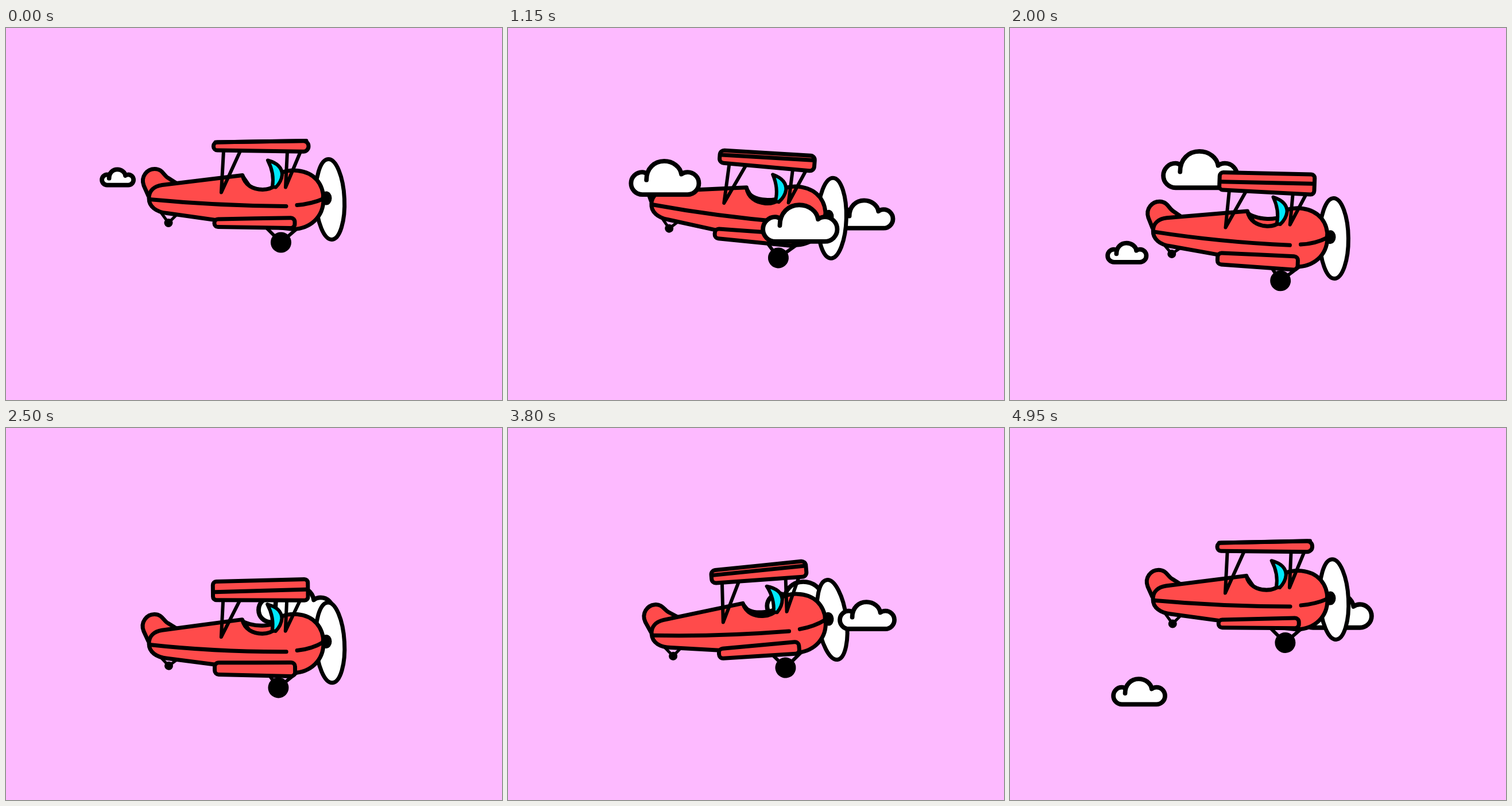
Animation, 864 px wide and 648 px high, one loop 5 s. Source, as an HTML page with a canvas:

```html
<!DOCTYPE html>
<html lang="en">
<head>
<meta charset="utf-8">
<title>Biplane</title>
<style>
  html, body { margin: 0; width: 100%; height: 100%; overflow: hidden; background: #fdbaff; }
  canvas { display: block; }
</style>
</head>
<body>
<canvas id="stage" width="864" height="648"></canvas>
<script>
const ctx = document.getElementById('stage').getContext('2d');
const LOOP = 5000, STEP = 50;
const RED = '#ff4b4b', CYAN = '#00e8fb', WHITE = '#fff', INK = '#000';
const HUB = { x: 558, y: 297 };

const FIN = new Path2D('M248 293L240 275C234 259 246 246 259 246C273 246 275 258 283 262L297 271L262 284Z');
const BODY = new Path2D(
  'M249 297C249 284 258 276 272 274L412 257C416 274 430 282 447 282C466 282 478 270 481 252' +
  'C490 249 500 248 508 249C537 252 553 272 553 299C553 330 530 350 500 351L365 335L280 323C262 321 249 312 249 297Z');
const GLASS = new Path2D('M456 231Q481 238 481 256Q480 268 470 278L464 277Q468 254 456 231Z');
const PUFF = 'C-35 -50 -20 -64 -1 -64C16 -64 30 -53 32 -39Q37 -43 44 -43' +
  'A21.5 21.5 0 0 1 44 0H-43A21.5 21.5 0 0 1 -43 -43Q-38 -43 -35 -40';
const CLOUD_FILL = new Path2D('M-35 -40' + PUFF);
const CLOUD_LINE = new Path2D('M-35 -28' + PUFF);

// mid: time at mid stage; y: height a + b*d + c*d*d, d in hundreds of pixels past the middle
const clouds = [
  { mid: -640, y: [260, 0, 0] },
  { mid: 719, y: [226.9, 9.6, 8], front: true },
  { mid: 1384, y: [359, 21.1, -3], front: true },
  { mid: 1727, y: [267.5, -24.2, 2.76] },
  { mid: 2722, y: [305.6, 3.1, 5.5] },
  { mid: 4055, y: [276.8, -24.3, 2] },
  { mid: 4390, y: [416, 33.5, -6], front: true },
  { mid: 5364, y: [281, -24, 1.5] }
];

function paint(path, fill, width = 7) {
  ctx.lineWidth = width;
  if (fill) {
    ctx.fillStyle = fill;
    ctx.fill(path);
  }
  ctx.stroke(path);
}

function line(...points) {
  const p = new Path2D();
  points.forEach(([x, y]) => p.lineTo(x, y));
  return p;
}

function dot(x, y, rx, ry = rx) {
  ctx.fillStyle = INK;
  ctx.beginPath();
  ctx.ellipse(x, y, rx, ry, 0, 0, 7);
  ctx.fill();
}

// Wing slab between two x positions; each end has its own top and bottom
function slab(x1, top1, bottom1, x2, top2, bottom2, radius) {
  const q = [[x1, top1], [x2, top2], [x2, bottom2], [x1, bottom1]];
  const r1 = Math.min(radius, (bottom1 - top1) / 2 - 0.3);
  const r2 = Math.min(radius, (bottom2 - top2) / 2 - 0.3);
  const p = new Path2D();
  p.moveTo((x1 + x2) / 2, (top1 + top2) / 2);
  for (let i = 1; i <= 4; i++) p.arcTo(...q[i % 4], ...q[(i + 1) % 4], i < 3 ? r2 : r1);
  p.closePath();
  return p;
}

function drawCloud(cloud, t) {
  const age = t - cloud.mid;
  const d = (0.349 * age + 2.5e-5 * age * age) / 100;
  const s = 1 - (Math.abs(d) / 2.64) ** 4.5;
  if (s < 0.4 || Math.abs(d) > 2.64) return;
  const [a, b, c] = cloud.y;
  const place = new DOMMatrix([s, 0, 0, s, 428 - 100 * d, a + b * d + c * d * d + 32 * s]);
  const placed = (shape) => {
    const p = new Path2D();
    p.addPath(shape, place);
    return p;
  };
  ctx.fillStyle = WHITE;
  ctx.fill(placed(CLOUD_FILL));
  paint(placed(CLOUD_LINE), null, 7.8);
}

function drawPlane(t) {
  const phase = t / LOOP * 2 * Math.PI, cos = Math.cos(phase), sin = Math.sin(phase);
  const k = (1 - cos) / 2;
  ctx.save();
  ctx.translate(HUB.x, 334.2 - 37.7 * cos - 0.8 * sin);
  ctx.rotate(0.081 * sin - 0.012 * k);
  ctx.translate(-HUB.x, -HUB.y);

  const prop = new Path2D();
  prop.ellipse(564.5, 299, 25, 70, -0.047, 0, 7);
  paint(prop, WHITE);
  paint(FIN, RED);

  // Undercarriage
  const wx = 479 - 5.5 * k, wy = 374 + 2.5 * k, ty = 340 - 4 * k;
  paint(line([454, 349], [wx, wy], [508, 349]), null, 6);
  dot(wx, wy, 18);
  paint(line([270, 322], [283, ty], [297, 326]), null, 5);
  dot(283, ty, 7.5);

  // Far cockpit rim, then the fuselage
  const rim = 282 - 14 * k;
  paint(new Path2D(`M413 260C417 ${rim - 5} 430 ${rim} 447 ${rim}C466 ${rim} 474 ${rim - 6} 479 262L470 278Q447 288 424 276Z`), RED);
  paint(BODY, RED);
  paint(GLASS, CYAN, 6);

  const sag = 3 * k;
  paint(new Path2D(`M250 299Q365 ${310 + sag} 488 ${311 + sag}M507 ${309 + sag}Q532 ${307 + sag} 553 298`));
  paint(slab(363, 333.5 - 2 * k, 347 + 5 * k, 503, 331 + 2 * k, 349 + 8 * k, 7), RED);
  dot(558, 297, 9.5, 12);

  // Struts and upper wing
  const roll = 9 * k;
  paint(line([379, 215 + roll], [375, 287], [408, 215 + roll]), null, 6);
  paint(line([490, 216 + roll], [487, 278], [513, 216 + roll]), null, 6);
  paint(slab(361.5, 199.5 - roll, 213.5 + roll, 527, 197 - roll, 216 + roll, 9 - 3 * k), RED);
  paint(line([365, 199.5 + roll], [523, 197 + roll]));
  ctx.restore();
}

function draw(t) {
  ctx.fillStyle = '#fdbaff';
  ctx.fillRect(0, 0, 864, 648);
  ctx.strokeStyle = INK;
  ctx.lineCap = ctx.lineJoin = 'round';
  clouds.filter(c => !c.front).forEach(c => drawCloud(c, t));
  drawPlane(t);
  clouds.filter(c => c.front).forEach(c => drawCloud(c, t));
}

const start = performance.now();
function tick() {
  const t = (performance.now() - start) % LOOP;
  draw(Math.floor(t / STEP) * STEP);
  requestAnimationFrame(tick);
}
tick();
</script>
</body>
</html>
```
